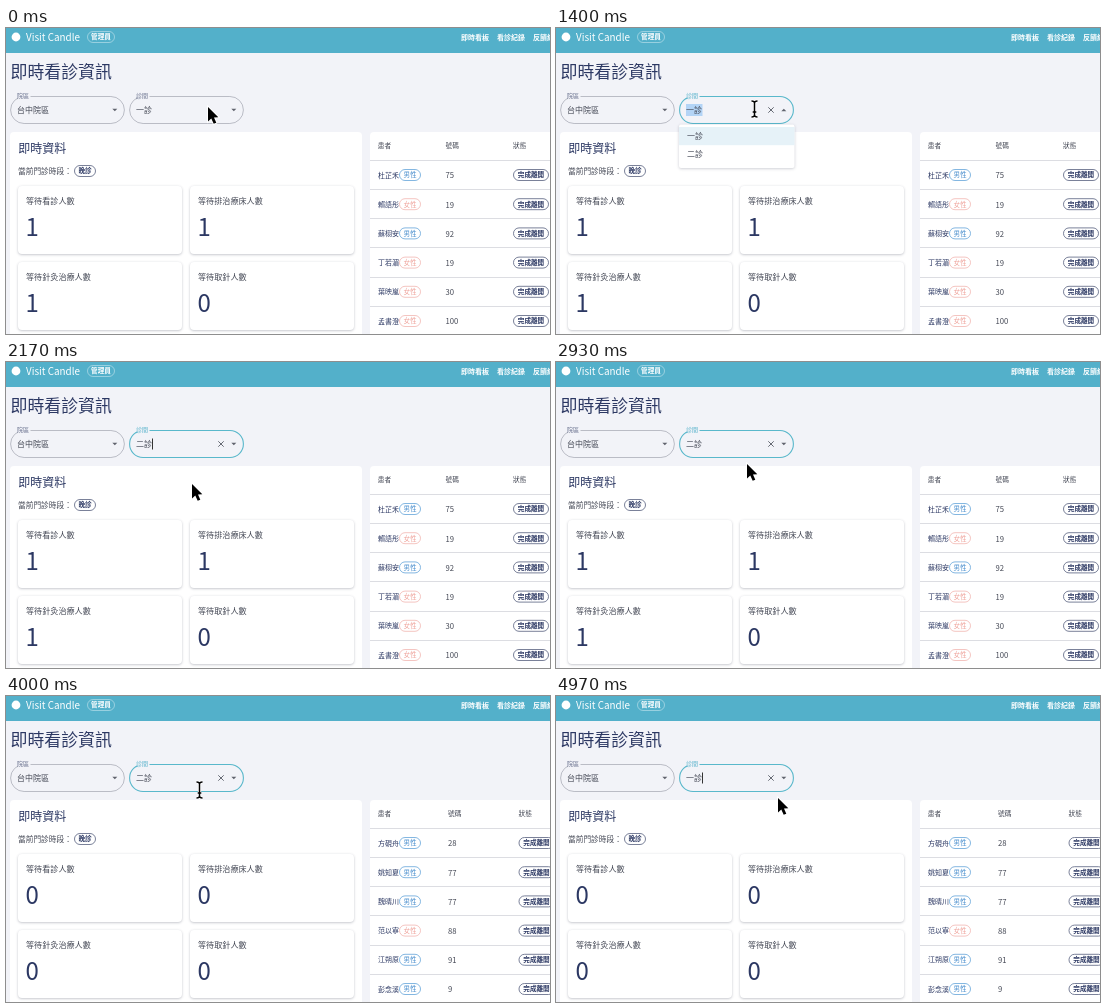
Write an HTML page with a canvas that moves like this. It is 544 px wide and 306 px high and loops after 5.01 s.

```html
<!DOCTYPE html>
<html lang="zh-Hant">
<head>
<meta charset="utf-8">
<title>即時看診資訊</title>
<style>
  html, body { margin: 0; width: 100%; height: 100%; overflow: hidden; background: #f2f3f8; }
  canvas { display: block; width: 544px; height: 306px; }
</style>
</head>
<body>
<canvas id="stage"></canvas>
<script>
const W = 544, H = 306, LOOP = 5010;
const FONT = '"Noto Sans CJK TC", "Noto Sans CJK", "Noto Sans CJK JP", "Noto Sans", sans-serif';
const NAVY = '#2c3863', BODY = '#434754', TEAL = '#53b0ca', GREY = '#b4b6c0', LABEL = '#68708d';

const canvas = document.getElementById('stage');
const ctx = canvas.getContext('2d');
const dpr = window.devicePixelRatio || 1;
canvas.width = W * dpr;
canvas.height = H * dpr;

const before = {
  counts: [1, 1, 1, 0],
  numX: 439.5, statusX: 507,
  rows: [['杜芷禾', 1, 75], ['賴語彤', 0, 19], ['蘇栩安', 1, 92],
         ['丁若湄', 0, 19], ['葉映嵐', 0, 30], ['孟書澄', 0, 100]]
};
const after = {
  counts: [0, 0, 0, 0],
  numX: 442, statusX: 512.5,
  rows: [['方硯舟', 1, 28], ['姚知夏', 1, 77], ['魏晴川', 1, 77],
         ['范以寧', 0, 88], ['江朔原', 1, 91], ['彭念溪', 1, 9]]
};
const cards = ['等待看診人數', '等待排治療床人數', '等待針灸治療人數', '等待取針人數'];

// Pointer path: time, x, y
const path = [
  [0, 202, 79], [570, 202, 79], [800, 198.5, 81], [1400, 198.5, 81],
  [1730, 188, 124], [1950, 187, 124], [2170, 186, 122], [2670, 186, 122],
  [2930, 191, 102], [3170, 193.5, 94], [4430, 193.5, 94],
  [4650, 199, 107], [4810, 200, 109], [4930, 211, 107], [4970, 222, 102], [LOOP, 222, 102]
];

const within = (t, a, b) => t >= a && t < b;

function pointerAt(t) {
  let i = 1;
  while (i < path.length - 1 && t >= path[i][0]) i++;
  const [t0, x0, y0] = path[i - 1], [t1, x1, y1] = path[i];
  const p = Math.min(1, (t - t0) / (t1 - t0));
  const e = p * p * (3 - 2 * p);
  return [x0 + (x1 - x0) * e, y0 + (y1 - y0) * e];
}

function text(s, x, cy, size, color = BODY, weight = 400) {
  ctx.font = `${weight} ${size}px ${FONT}`;
  ctx.fillStyle = color;
  ctx.fillText(s, x, cy + size * 0.37);
}

function box(x, y, w, h, r, fill, stroke, line = 1) {
  ctx.beginPath();
  ctx.roundRect(x, y, w, h, r);
  if (fill) { ctx.fillStyle = fill; ctx.fill(); }
  if (stroke) { ctx.strokeStyle = stroke; ctx.lineWidth = line; ctx.stroke(); }
}

function rect(x, y, w, h, color) {
  ctx.fillStyle = color;
  ctx.fillRect(x, y, w, h);
}

function raised(x, y, w, h, r, blur, drop, alpha) {
  ctx.save();
  ctx.shadowColor = `rgba(40, 45, 70, ${alpha})`;
  ctx.shadowBlur = blur * dpr;
  ctx.shadowOffsetY = drop * dpr;
  box(x, y, w, h, r, '#fff');
  ctx.restore();
}

function shape(points, fill, stroke, line = 1) {
  ctx.beginPath();
  points.forEach(([x, y]) => ctx.lineTo(x, y));
  ctx.closePath();
  if (stroke) { ctx.strokeStyle = stroke; ctx.lineWidth = line; ctx.stroke(); }
  ctx.fillStyle = fill;
  ctx.fill();
}

function chip(s, x, cy, w, color, textColor = color, weight = 700) {
  const size = 6.6;
  box(x + 0.5, cy - 5.5, w - 1, 11, 5.5, null, color, 0.8);
  text(s, x + (w - s.length * size) / 2, cy, size, textColor, weight);
}

function header() {
  rect(0, 0, W, 25, TEAL);
  ctx.beginPath();
  ctx.arc(10, 9, 4.4, 0, Math.PI * 2);
  ctx.fillStyle = '#fff';
  ctx.fill();
  text('Visit Candle', 20, 9, 9.9, '#fff', 500);
  chip('管理員', 81, 9, 28, 'rgba(255,255,255,.5)', '#fff');
  text('即時看板', 455, 9, 7, '#fff', 700);
  text('看診紀錄', 491, 9, 7, '#fff', 700);
  text('反饋紀錄', 527, 9, 7, '#fff', 700);
}

function field(x, label, value, focused, open) {
  const color = focused ? '#59b8cb' : GREY;
  box(x + 0.6, 68.5, 113.8, 27, 13.5, null, color, focused ? 1.1 : 0.9);
  rect(x + 5.5, 66, 15, 4, '#f2f3f8');
  text(label, x + 7, 68, 6, focused ? TEAL : LABEL);
  text(value, x + 7, 82, 8);
  const tip = open ? -1.3 : 1.3;
  shape([[x + 102.3, 82 - tip], [x + 107.3, 82 - tip], [x + 104.8, 82 + tip]], '#60636d');
}

function selector(t) {
  const focused = t >= 800;
  const open = within(t, 1230, 1930) || within(t, 4130, 4810);
  const second = within(t, 1930, 4810);
  if (within(t, 800, 1930)) rect(130, 76, 16.5, 12, '#b3d4f6');
  field(123, '診間', second ? '二診' : '一診', focused, open);
  if (t >= 640) {
    ctx.beginPath();
    ctx.moveTo(212.3, 79.3); ctx.lineTo(217.7, 84.7);
    ctx.moveTo(217.7, 79.3); ctx.lineTo(212.3, 84.7);
    ctx.strokeStyle = '#666a74';
    ctx.lineWidth = 1;
    ctx.stroke();
  }
  const blink = Math.floor((t - 2170) / 500) % 2 === 0;
  if (t >= 1930 && (t < 2170 || t >= 4810 || blink)) rect(146, 76.5, 1, 11, '#333');
  return open;
}

function menu(t) {
  const chosen = t < 3000 ? 0 : 1;
  const [, py] = pointerAt(t);
  raised(123, 96.5, 115.5, 43.5, 2, 3, 0.8, 0.25);
  ['一診', '二診'].forEach((s, i) => {
    const y = 99 + i * 18.2;
    const hover = py >= y && py < y + 18.2;
    if (i === chosen) rect(123, y, 115.5, 18.2, '#e6f2f8');
    else if (hover) rect(123, y, 115.5, 18.2, '#f4f4f5');
    text(s, 131, y + 9, 8);
  });
}

function summary(data) {
  box(4, 104, 352, 220, 4, '#fff');
  text('即時資料', 12.2, 120.4, 12, NAVY);
  text('當前門診時段：', 12, 143, 7.7);
  chip('晚診', 68, 143, 22, '#59617f', NAVY);
  cards.forEach((s, i) => {
    const x = 12 + (i % 2) * 172, y = 158 + (i >> 1) * 76;
    raised(x, y, 164, 68, 4, 2.5, 0.7, 0.3);
    text(s, x + 8, y + 14.7, 8.1);
    text(String(data.counts[i]), x + 7.5, y + 41.5, 24, NAVY);
  });
}

function table(data) {
  box(364, 104, 200, 220, 4, '#fff');
  text('患者', 371.7, 118, 6.7);
  text('號碼', data.numX, 118, 6.7);
  text('狀態', data.statusX, 118, 6.7);
  data.rows.forEach(([name, male, num], i) => {
    const cy = 147 + i * 29.2;
    rect(364, Math.floor(cy - 14.8), 180, 1, '#dcdde2');
    text(name, 372, cy, 7, NAVY, 500);
    if (male) chip('男性', 393, cy, 22, '#65a5da', '#478dcd', 500);
    else chip('女性', 393, cy, 22, '#f2b7b1', '#efa49c', 500);
    text(String(num), data.numX, cy + 0.5, 7.7);
    chip('完成離開', data.statusX, cy, 36, '#59617f', NAVY);
  });
}

function arrow() {
  shape([[0, 0], [0, 14.4], [3.3, 11.4], [5.7, 16.8], [8.3, 15.7], [6, 10.4], [10.3, 10.2]],
    '#000', '#fff', 1.8);
}

function beam() {
  for (const [color, width] of [['#fff', 3], ['#000', 1.5]]) {
    ctx.beginPath();
    ctx.moveTo(-3, -8); ctx.quadraticCurveTo(0, -8, 0, -6);
    ctx.lineTo(0, 6); ctx.quadraticCurveTo(0, 8, -3, 8);
    ctx.moveTo(3, -8); ctx.quadraticCurveTo(0, -8, 0, -6);
    ctx.moveTo(0, 6); ctx.quadraticCurveTo(0, 8, 3, 8);
    ctx.moveTo(-1.8, 3); ctx.lineTo(1.8, 3);
    ctx.strokeStyle = color;
    ctx.lineWidth = width;
    ctx.stroke();
  }
}

function hand() {
  ctx.beginPath();
  ctx.moveTo(-1.2, 8);
  ctx.lineTo(-1.2, 1);
  ctx.quadraticCurveTo(0, -1, 1.2, 1);
  ctx.lineTo(1.2, 5.5);
  ctx.lineTo(6.2, 6.4);
  ctx.quadraticCurveTo(8, 7, 7.8, 9);
  ctx.lineTo(6.4, 15);
  ctx.lineTo(-0.8, 15);
  ctx.lineTo(-4.6, 9.2);
  ctx.quadraticCurveTo(-4, 7, -1.2, 10);
  ctx.closePath();
  ctx.fillStyle = '#fff';
  ctx.fill();
  ctx.strokeStyle = '#000';
  ctx.lineWidth = 1;
  ctx.stroke();
}

function pointer(t, open) {
  const [x, y] = pointerAt(t);
  ctx.save();
  ctx.translate(x, y);
  if (open && y > 98) hand();
  else if (t >= 640 && y < 97) beam();
  else arrow();
  ctx.restore();
}

function draw(t) {
  const data = t < 3230 ? before : after;
  ctx.setTransform(dpr, 0, 0, dpr, 0, 0);
  rect(0, 0, W, H, '#f2f3f8');
  header();
  text('即時看診資訊', 4.5, 43.5, 16.9, NAVY);
  field(4, '院區', '台中院區', false, false);
  summary(data);
  table(data);
  const open = selector(t);
  if (open) menu(t);
  pointer(t, open);
}

const start = performance.now();
function tick() {
  draw((performance.now() - start) % LOOP);
  requestAnimationFrame(tick);
}
tick();
</script>
</body>
</html>
```
